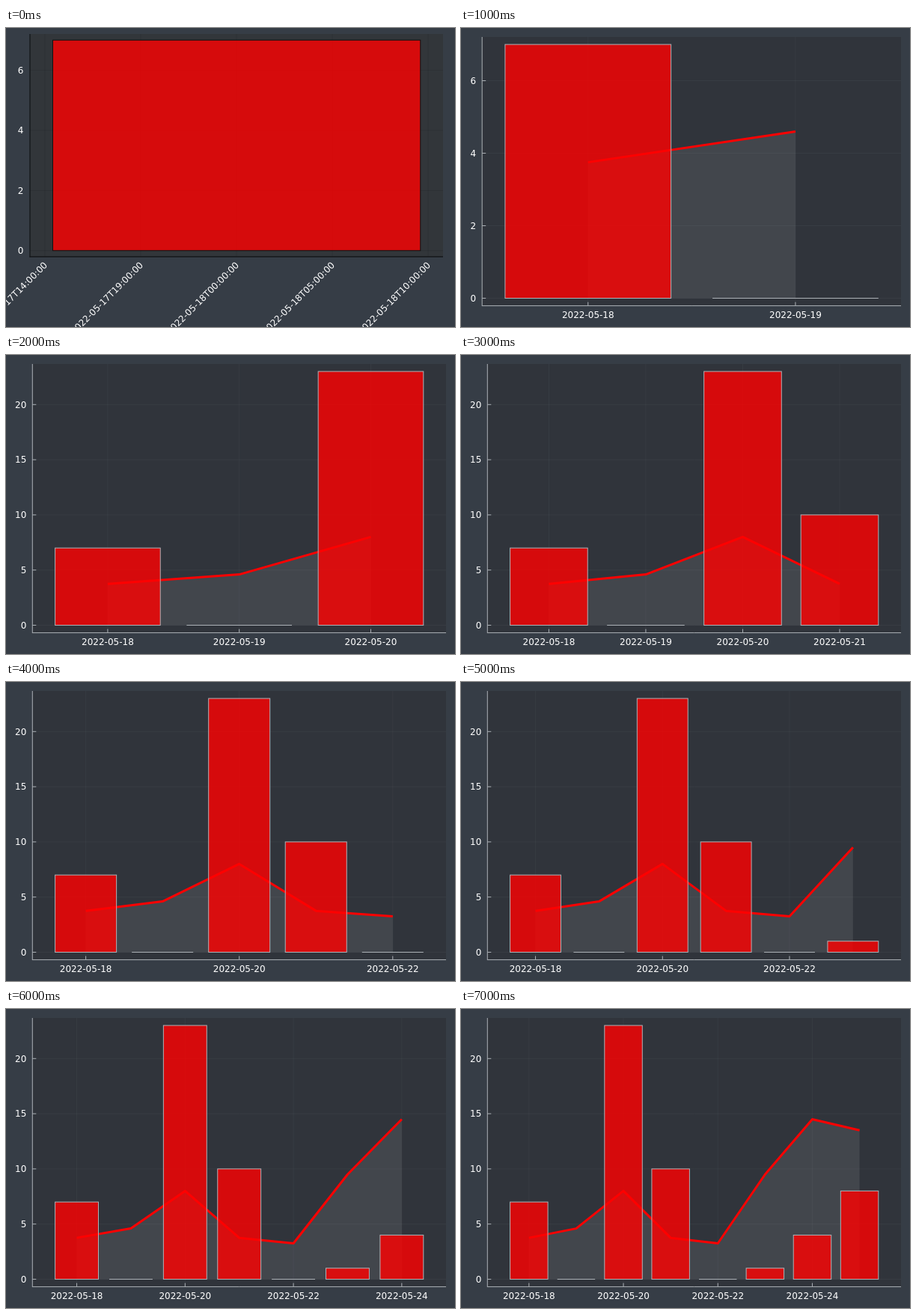
An HTML page with a canvas that plays this animation: 600x400 px, repeating every 8 s.

```html
<!DOCTYPE html>
<html lang="en">
<head>
<meta charset="utf-8">
<title>Daily bars with trend line</title>
<style>
  html, body { margin: 0; width: 100%; height: 100%; overflow: hidden; background: #363d46; }
  canvas { display: block; }
</style>
</head>
<body>
<canvas id="stage" width="600" height="400"></canvas>
<script>
const ctx = document.getElementById('stage').getContext('2d');
const COUNTS = [7, 0, 23, 10, 0, 1, 4, 8];
const TREND = [3.75, 4.6, 8, 3.75, 3.25, 9.5, 14.5, 13.5];
const STEP_MS = 1000;
const FIRST_DAY = 18;
const AXIS = '#adb2b7';
const BAR = 'rgba(255,0,0,0.8)';

function line(x1, y1, x2, y2, color, width = 1) {
  ctx.strokeStyle = color;
  ctx.lineWidth = width;
  ctx.beginPath();
  ctx.moveTo(x1, y1);
  ctx.lineTo(x2, y2);
  ctx.stroke();
}

function label(text, x, y, align) {
  ctx.fillStyle = '#fff';
  ctx.textAlign = align;
  ctx.fillText(text, x, y);
}

function bar(x, y, w, h, edge) {
  ctx.fillStyle = BAR;
  ctx.fillRect(x, y, w, h);
  ctx.strokeStyle = edge;
  ctx.lineWidth = 1;
  if (h) ctx.strokeRect(x, y, w, h);
  else line(x, y, x + w, y, edge);
}

function clear() {
  ctx.fillStyle = '#363d46';
  ctx.fillRect(0, 0, 600, 400);
  ctx.font = '12px "DejaVu Sans", sans-serif';
  ctx.textBaseline = 'alphabetic';
}

// A single day: hourly axis with slanted labels and dark edges.
function drawSingleDay() {
  const grid = 'rgba(0,0,0,0.1)';
  const yOf = v => 297.8 - v * 40.23;
  ctx.fillStyle = '#32363a';
  ctx.fillRect(32, 8, 552, 298);

  const times = ['17T14', '17T19', '18T00', '18T05', '18T10'];
  times.forEach((time, i) => {
    const x = 52 + i * 128;
    line(x, 8, x, 306, grid);
    ctx.save();
    ctx.translate(x + 4, 318);
    ctx.rotate(-Math.PI / 4);
    label(`2022-05-${time}:00:00`, 0, 0, 'right');
    ctx.restore();
  });
  for (let v = 0; v <= 6; v += 2) {
    line(32, yOf(v), 584, yOf(v), grid);
    label(v, 23.5, yOf(v) + 4.4, 'right');
  }
  bar(62.5, yOf(7), 491.3, 7 * 40.23, '#111');
  line(32, 8, 32, 306.5, '#14171a', 1.3);
  line(31.5, 306, 584, 306, '#14171a', 1.3);
}

function drawDays(n) {
  const wide = n === 2;
  const left = wide ? 28.2 : 35.3, right = 588, top = 12, bottom = 371.6;
  const barLeft = wide ? 58.9 : 65.6, barRight = 557.8;
  const unit = (barRight - barLeft) / (n - 0.2);
  const zero = 361.5;
  const scale = (zero - 22) / Math.max(...COUNTS.slice(0, n));
  const xOf = i => barLeft + (i + 0.4) * unit;
  const yOf = v => zero - v * scale;
  const grid = 'rgba(173,178,183,0.06)';
  const dayStep = n > 4 ? 2 : 1;
  const valueStep = wide ? 2 : 5;
  const valueMax = wide ? 6 : 20;

  ctx.fillStyle = '#30343b';
  ctx.fillRect(left, top, right - left, bottom - top);

  for (let i = 0; i < n; i += dayStep) line(xOf(i), top, xOf(i), bottom, grid);
  for (let v = 0; v <= valueMax; v += valueStep) line(left, yOf(v), right, yOf(v), grid);

  line(left, top, left, bottom + 0.5, AXIS);
  line(left, bottom, right, bottom, AXIS);
  for (let i = 0; i < n; i += dayStep) {
    line(xOf(i), bottom, xOf(i), bottom - 5, AXIS);
    label(`2022-05-${FIRST_DAY + i}`, xOf(i), 387.6, 'center');
  }
  for (let v = 0; v <= valueMax; v += valueStep) {
    line(left, yOf(v), left + 5, yOf(v), AXIS);
    label(v, left - 8, yOf(v) + 4.4, 'right');
  }

  const trend = new Path2D();
  for (let i = 0; i < n; i++) trend.lineTo(xOf(i), yOf(TREND[i]));
  const area = new Path2D(trend);
  area.lineTo(xOf(n - 1), zero);
  area.lineTo(xOf(0), zero);
  ctx.fillStyle = 'rgba(255,255,255,0.085)';
  ctx.fill(area);
  ctx.strokeStyle = '#f00';
  ctx.lineWidth = 3;
  ctx.lineJoin = 'round';
  ctx.stroke(trend);
  ctx.lineJoin = 'miter';

  for (let i = 0; i < n; i++) {
    const h = COUNTS[i] * scale;
    bar(xOf(i) - 0.4 * unit, zero - h, 0.8 * unit, h, AXIS);
  }
}

function render(now) {
  const days = 1 + Math.floor(now / STEP_MS) % COUNTS.length;
  clear();
  if (days === 1) drawSingleDay();
  else drawDays(days);
}

function tick() {
  render(performance.now() - start);
  requestAnimationFrame(tick);
}

const start = performance.now();
tick();
</script>
</body>
</html>
```
